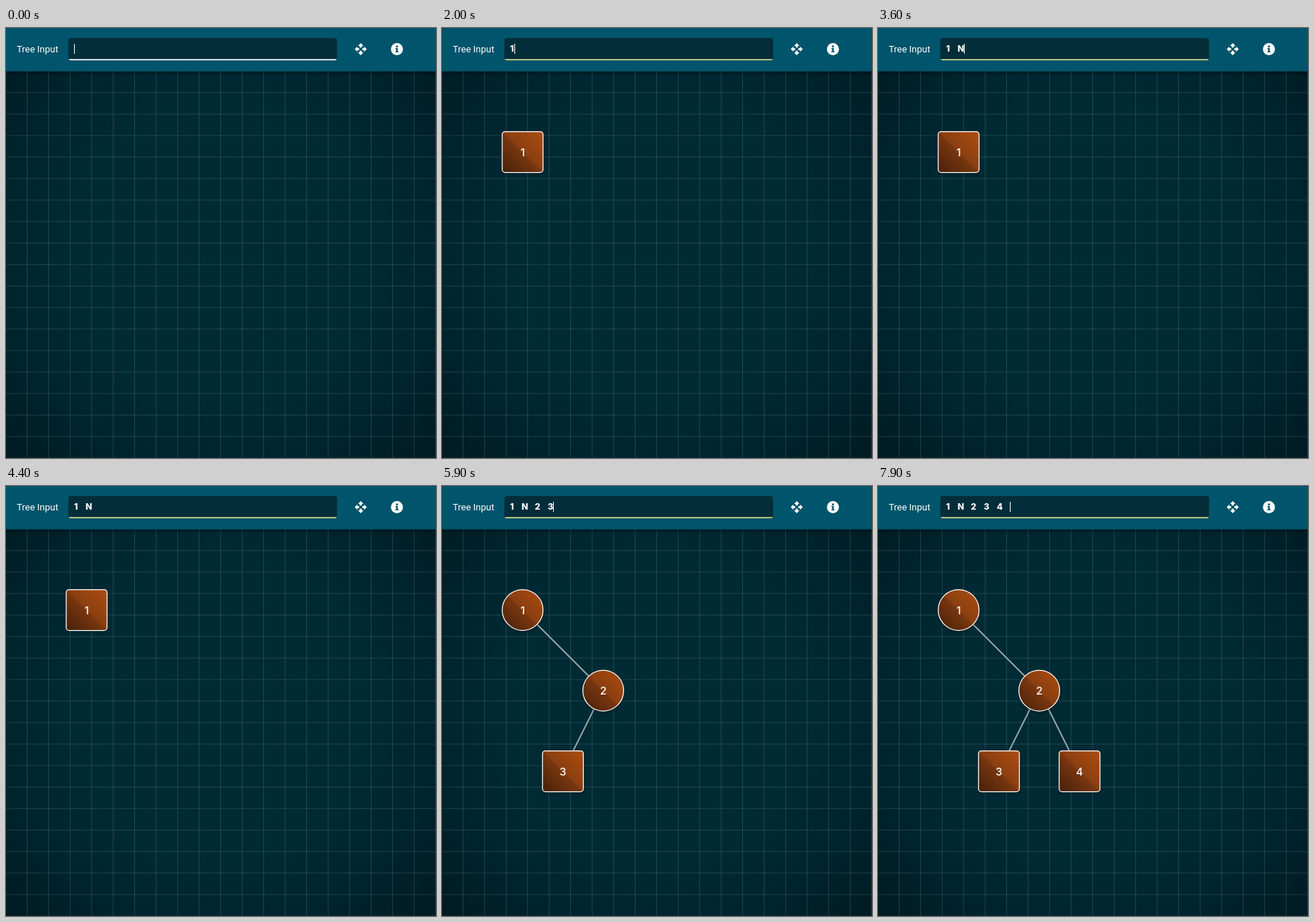
Write an HTML page with a canvas that moves like this. It is 600x600 px and loops after 8 s.

```html
<!DOCTYPE html>
<html lang="en">
<head>
<meta charset="utf-8">
<title>Tree Input</title>
<style>
  html, body { margin: 0; width: 100%; height: 100%; overflow: hidden; background: #002b35; }
  canvas { display: block; }
</style>
</head>
<body>
<canvas id="stage" width="600" height="600"></canvas>
<script>
const ctx = document.getElementById('stage').getContext('2d');
const LOOP = 8000;
const BLINK = 500;

// Each key press: time, character, where the character starts, where the caret goes
const keys = [
  { time: 0, char: '', x: 95, caret: 95 },
  { time: 2000, char: '1', x: 95, caret: 101 },
  { time: 2400, char: ' ', x: 101, caret: 110 },
  { time: 3500, char: 'N', x: 111, caret: 120 },
  { time: 3800, char: ' ', x: 120, caret: 129 },
  { time: 4500, char: '2', x: 129.5, caret: 137 },
  { time: 5200, char: ' ', x: 137, caret: 147 },
  { time: 5500, char: '3', x: 147.5, caret: 155 },
  { time: 6000, char: ' ', x: 155, caret: 165 },
  { time: 7200, char: '4', x: 165.7, caret: 174 },
  { time: 7600, char: ' ', x: 174, caret: 184 }
];

// Tree layouts; columns and rows count from the root
const layouts = [
  { time: 0, nodes: [] },
  { time: 2000, nodes: [{ label: '1', col: 0, row: 0 }] },
  { time: 4500, nodes: [
    { label: '1', col: 0, row: 0 },
    { label: '2', col: 1, row: 1, parent: 0 }] },
  { time: 5500, nodes: [
    { label: '1', col: 0, row: 0 },
    { label: '2', col: 2, row: 1, parent: 0 },
    { label: '3', col: 1, row: 2, parent: 1 }] },
  { time: 7200, nodes: [
    { label: '1', col: 0, row: 0 },
    { label: '2', col: 2, row: 1, parent: 0 },
    { label: '3', col: 1, row: 2, parent: 1 },
    { label: '4', col: 3, row: 2, parent: 1 }] }
];

const nodeX = node => 112.5 + node.col * 56.25;
const nodeY = node => 173 + node.row * 112.5;

function gradient(g, ...stops) {
  for (const [at, color] of stops) g.addColorStop(at, color);
  return g;
}

function text(str, x, y, font, align = 'left') {
  ctx.font = font;
  ctx.textAlign = align;
  ctx.fillStyle = '#fff';
  ctx.fillText(str, x, y);
}

function roundRect(x, y, w, h, r) {
  ctx.beginPath();
  ctx.roundRect(x, y, w, h, r);
}

function drawBoard() {
  ctx.fillStyle = gradient(ctx.createRadialGradient(300, 310, 0, 300, 310, 424),
    [0, '#002b34'], [0.5, '#002a34'], [0.7, '#00252f'], [1, '#001a22']);
  ctx.fillRect(0, 0, 600, 600);

  ctx.fillStyle = 'rgba(255,255,255,0.13)';
  for (let p = 29; p < 600; p += 30) {
    ctx.fillRect(p, 60, 1, 540);
    if (p > 60) ctx.fillRect(0, p + 0.6, 600, 1);
  }
}

function drawArrowsIcon(x, y) {
  ctx.save();
  ctx.translate(x, y);
  ctx.scale(0.77, 0.77);
  ctx.fillStyle = '#fff';
  for (let i = 0; i < 4; i++) {
    ctx.beginPath();
    ctx.moveTo(0, -11);
    ctx.lineTo(5, -6);
    ctx.lineTo(2, -6);
    ctx.lineTo(2, -3);
    ctx.lineTo(-2, -3);
    ctx.lineTo(-2, -6);
    ctx.lineTo(-5, -6);
    ctx.fill();
    ctx.rotate(Math.PI / 2);
  }
  ctx.restore();
}

function drawInfoIcon(x, y) {
  ctx.fillStyle = '#fff';
  ctx.beginPath();
  ctx.arc(x, y, 8.4, 0, 7);
  ctx.fill();
  ctx.fillStyle = '#00546b';
  ctx.beginPath();
  ctx.arc(x, y - 3.7, 1.5, 0, 7);
  ctx.fill();
  ctx.fillRect(x - 2.2, y - 1.3, 3.3, 1.3);
  ctx.fillRect(x - 1.1, y - 1.3, 2.2, 5.2);
  ctx.fillRect(x - 2.2, y + 3, 4.4, 1.4);
}

function drawHeader(time) {
  ctx.save();
  ctx.shadowColor = 'rgba(0,0,0,0.35)';
  ctx.shadowBlur = 6;
  ctx.shadowOffsetY = 2;
  ctx.fillStyle = '#00546b';
  ctx.fillRect(-10, -10, 620, 70.5);
  ctx.restore();

  text('Tree Input', 15, 34, '400 13px Roboto, sans-serif');

  const typed = keys.filter(key => key.time <= time);
  ctx.save();
  roundRect(87, 14, 375, 31.2, 4);
  ctx.clip();
  ctx.fillStyle = '#042d3a';
  ctx.fillRect(87, 14, 375, 32);
  ctx.fillStyle = typed.length > 1 ? '#d9e08c' : '#fff';
  ctx.fillRect(87, 43.4, 375, 2);
  ctx.restore();

  for (const key of typed) text(key.char, key.x, 33, '800 12px Inter, sans-serif');

  const last = typed[typed.length - 1];
  if ((time - last.time) % (2 * BLINK) < BLINK) {
    ctx.fillStyle = '#fff';
    ctx.fillRect(last.caret, 22, 1, 14);
  }

  drawArrowsIcon(495, 29.5);
  drawInfoIcon(545.5, 29.5);
}

function drawNode(node, isLeaf) {
  const x = nodeX(node), y = nodeY(node), r = 28.5;
  ctx.save();
  ctx.shadowColor = 'rgba(0,0,0,0.5)';
  ctx.shadowBlur = 4;
  ctx.shadowOffsetY = 1.5;
  ctx.fillStyle = gradient(ctx.createLinearGradient(x - r, y + r, x + r, y - r),
    [0, '#46200a'], [0.5, '#79370f'], [0.5, '#8a3e10'], [1, '#ac4d10']);
  roundRect(x - r, y - r, 2 * r, 2 * r, isLeaf ? 4 : r);
  ctx.fill();
  ctx.restore();
  ctx.strokeStyle = '#fff';
  ctx.lineWidth = 1.25;
  ctx.stroke();
  text(node.label, x, y + 5.5, '500 15px Inter, sans-serif', 'center');
}

function drawTree(time) {
  const { nodes } = layouts.filter(layout => layout.time <= time).pop();
  ctx.strokeStyle = '#9aabae';
  ctx.lineWidth = 1.8;
  for (const node of nodes) {
    if (node.parent === undefined) continue;
    const parent = nodes[node.parent];
    ctx.beginPath();
    ctx.moveTo(nodeX(parent), nodeY(parent));
    ctx.lineTo(nodeX(node), nodeY(node));
    ctx.stroke();
  }
  nodes.forEach((node, i) => drawNode(node, !nodes.some(other => other.parent === i)));
}

function render() {
  const time = performance.now() % LOOP;
  drawBoard();
  drawTree(time);
  drawHeader(time);
  requestAnimationFrame(render);
}
render();
</script>
</body>
</html>
```
